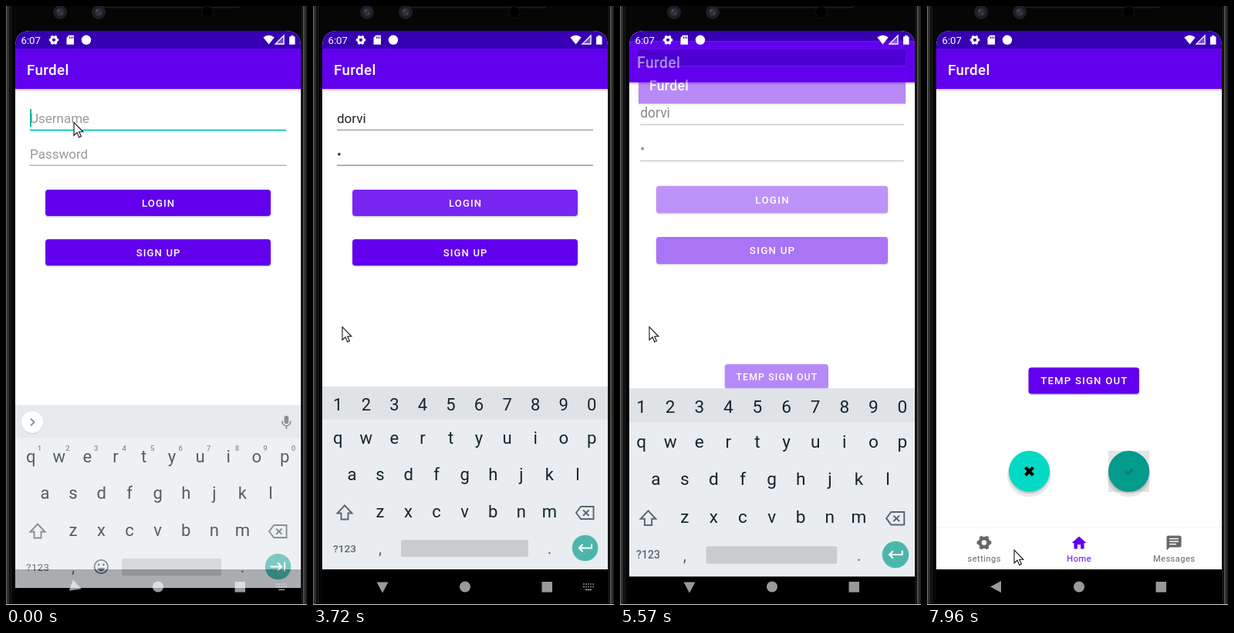
An HTML page that plays this animation: 390 by 773 pixels, repeating every 8 s.

```html
<!DOCTYPE html>
<html lang="en">
<head>
<meta charset="utf-8">
<title>Login demo</title>
<style>
html, body { margin: 0; width: 100%; height: 100%; overflow: hidden; background: #000; }
svg { display: block; width: 100%; height: 100%; font-family: Roboto, "Noto Sans", sans-serif; }
</style>
</head>
<body>
<svg id="stage" viewBox="0 0 390 773"></svg>
<script>
const LOOP = 8000, APP = 'Furdel', USER = 'dorvi';
const PURPLE = '#6200ee', TEAL = '#03dac5';

const rect = (x, y, w, h, fill, more = '') =>
  `<rect x="${x}" y="${y}" width="${w}" height="${h}" fill="${fill}" ${more}/>`;
const circle = (x, y, r, fill, more = '') =>
  `<circle cx="${x}" cy="${y}" r="${r}" fill="${fill}" ${more}/>`;
const path = (d, fill, more = '') => `<path d="${d}" fill="${fill}" ${more}/>`;
const line = (d, color, width = 2, more = '') =>
  path(d, 'none', `stroke="${color}" stroke-width="${width}" ${more}`);
const text = (x, y, size, fill, str, more = '') =>
  `<text x="${x}" y="${y}" font-size="${size}" fill="${fill}" ${more}>${str}</text>`;
const group = (id, body, more = '') => `<g id="${id}" ${more}>${body}</g>`;
const MID = 'text-anchor="middle"';

const gear = (x, y, r, color) =>
  circle(x, y, r * .58, 'none', `stroke="${color}" stroke-width="${r * .48}"`) +
  circle(x, y, r * .85, 'none',
    `stroke="${color}" stroke-width="${r * .3}" pathLength="12" stroke-dasharray="1 1" stroke-dashoffset=".5"`);

const button = (x, y, w, h, label, size = 13) =>
  rect(x, y + 1.5, w, h, '#000', 'rx="4" opacity=".2"') +
  rect(x, y, w, h, PURPLE, 'rx="4"') +
  buttonLabel(x + w / 2, y + h / 2, label, size);
const buttonLabel = (x, y, label, size) =>
  text(x + .6, y + 4.7, size, '#fff', label, `${MID} font-weight="500" letter-spacing="1.18"`);

const appTop = () =>
  rect(12, 32, 370, 740, '#fff') +
  rect(12, 107, 370, 3, '#000', 'opacity=".09"') +
  rect(12, 107, 370, 1.2, '#000', 'opacity=".12"') +
  rect(12, 32, 370, 23, '#3700b3') +
  rect(12, 55, 370, 52, PURPLE) +
  text(27, 88.7, 18.8, '#fff', APP, 'font-weight="500" letter-spacing=".35"');

function phone() {
  const side = x => rect(x, 0, 1.2, 773, '#8b8d86') + rect(x + 2.6, 0, 1, 773, '#4a4b47');
  return rect(0, 0, 390, 773, '#060606') +
    side(.4) + side(385.4) + rect(6, 0, 1, 773, '#252525') + rect(383, 0, 1, 773, '#252525') +
    line('M124 0Q125 2 129 2H298Q302 2 303 0', '#2a2a2a', 1) +
    [70, 120].map(x => circle(x, 8, 9, '#1d1f24') + circle(x, 8, 5, '#2d3038') +
      circle(x - 2, 6, 1.4, '#50545c') + circle(x + 2, 10, 1.2, '#484c55')).join('') +
    circle(261, 8, 7.5, '#000', 'stroke="#121212"') +
    rect(0, 772, 390, 1, '#cfc5c8');
}

function loginScreen() {
  return appTop() +
    group('userLine', '') + group('passLine', '') +
    text(31, 151.2, 17, '#999', 'Username', 'id="userText"') +
    text(31, 196.5, 17, '#999', 'Password', 'id="passText"') +
    rect(31, 133, 2, 23, '#06b5a5', 'id="caret"') +
    button(51, 237, 292, 34, '') +
    rect(51, 237, 292, 34, '#fff', 'id="focus" rx="4"') +
    circle(197, 254, 110, '#fff', 'id="ripple" opacity=".22" clip-path="url(#loginClip)"') +
    buttonLabel(197, 254, 'LOGIN', 13) +
    button(51, 301, 292, 34, 'SIGN UP');
}

function homeScreen() {
  const fab = (x, color) =>
    circle(x, 605, 28.5, '#000', 'opacity=".09"') + circle(x, 602.5, 27, '#000', 'opacity=".13"');
  const tab = (x, label, color) =>
    text(x + .2, 717, 11.1, color, label, `${MID} letter-spacing=".45"`);
  return appTop() +
    button(131.5, 466.5, 143.5, 34, 'TEMP SIGN OUT', 13.2) +
    fab(132.5) + circle(132.5, 600.5, 26.5, TEAL) +
    line('M127.5 595.5L137.5 605.5M137.5 595.5L127.5 605.5', '#000', 4.2) +
    fab(261.5) + rect(235, 574, 53, 53, '#000', 'opacity=".1"') +
    circle(261.5, 600.5, 26.5, '#039b8c') +
    line('M257 600.8L260.3 604L266.5 597.5', '#027e72', 2.8) +
    rect(12, 672.5, 370, 1, '#f0f0f0') + rect(12, 673.5, 370, 54, '#fff') +
    gear(74, 692.5, 9.4, '#666') + tab(74, 'settings', '#666') +
    path('M197 684.5L187.5 693H190.5V700.5H195V695H199V700.5H203.5V693H206.5Z', PURPLE) +
    tab(197, 'Home', PURPLE) +
    path('M312.5 683.5H327.5Q329.5 683.5 329.5 685.5V696.5Q329.5 698.5 327.5 698.5H314.5L310.5 702.5V685.5Q310.5 683.5 312.5 683.5Z', '#666') +
    line('M314 687.5H326M314 691H326M314 694.5H323', '#fff', 1.6) +
    tab(320, 'Messages', '#666');
}

function keyboard() {
  const ink = '#14252d', grey = '#5a676e';
  const row = (chars, x, y) => [...chars].map((c, i) =>
    text(x + i * 36.55, y, 22, ink, c, MID)).join('');
  const hints = [...'1234567890'].map((c, i) =>
    text(43.5 + i * 36.55, 550, 9.5, grey, c, `${MID} font-weight="500"`)).join('');
  const mic = path('M360.5 507.5a2.8 2.8 0 0 1 5.6 0v5a2.8 2.8 0 0 1-5.6 0z', grey) +
    line('M358 511.5v1a5.3 5.3 0 0 0 10.6 0v-1M363.3 517.8v4', grey, 1.7);
  const tools =
    circle(81.5, 511, 5, 'none', `stroke="${grey}" stroke-width="2"`) +
    line('M85 514.5L91 520.5', grey, 2.3) +
    line('M131 505.5H143Q144.500 505.500 144.500 507V514L139 520H131Q129.500 520 129.500 518.500V507Q129.500 505.500 131 505.500ZM139 520V514H144.500M133.500 513Q136 517 139 514', grey, 1.7) +
    circle(134, 510, 1.1, grey) + circle(140, 510, 1.1, grey) +
    text(190, 517.3, 13.3, grey, 'GIF', `${MID} font-weight="900" letter-spacing=".6"`) +
    rect(237.5, 505.5, 15, 15, grey, 'rx="1.5"') +
    rect(277, 502, 1, 22, '#c6cbcf') +
    [305, 311, 317].map(x => circle(x, 513, 2, grey)).join('');
  return rect(12, 491, 370, 236, '#e9edf0') +
    rect(12, 491, 370, 42.500, '#dfe3e6') +
    group('strip',
      rect(346, 491, 36, 42.5, '#cdd1d4', 'id="micBox"') +
      circle(34, 514, 14.2, '#000', 'opacity=".12"') + circle(34, 513, 14, '#fff') +
      line('', grey, 1.9, 'id="chevron"') + group('tools', tools) + mic + hints) +
    group('digits', row('1234567890', 32.3, 521.5)) +
    row('qwertyuiop', 32.3, 565) + row('asdfghjkl', 50.5, 612) + row('zxcvbnm', 87, 659.500) +
    line('M41 644.5L50.500 654.500H45.500V662.500H36.500V654.500H31.500Z', grey, 1.9) +
    line('M347 646H363.500V662H347L341 654ZM350 650.500L357.500 657.700M357.500 650.500L350 657.700', grey, 1.9) +
    text(41, 704.8, 13.7, grey, '?123', `${MID} font-weight="500"`) +
    text(87, 707, 21, grey, ',', MID) + text(306.500, 707, 21, grey, '.', MID) +
    group('emoji', circle(123.3, 699.5, 8.7, 'none', `stroke="${grey}" stroke-width="1.8"`) +
      circle(120.2, 697, 1.4, grey) + circle(126.4, 697, 1.4, grey) +
      path('M118.200 701.300H128.400Q126.500 705.500 123.300 705.500T118.200 701.300Z', grey)) +
    rect(150, 689, 129, 22, '#c9cdd0', 'id="space" rx="2.5"') +
    circle(352.5, 699.5, 16.8, '#4db6ac') + line('', '#fff', 2, 'id="enter"');
}

function statusIcons() {
  return text(19.5, 48.7, 13.2, '#fff', '6:07') + gear(62, 43.8, 6.3, '#fff') +
    path('M81.500 37.800H88V49.700H78.500V41Z', '#fff') +
    line('M82.500 39.500V42M84.500 39.500V42M86.500 39.500V42', '#3700b3', 1) +
    circle(104, 43.8, 6.2, '#fff') +
    path('M333.300 40.500Q340.500 35 347.700 40.500L340.500 49.500Z', '#fff') +
    path('M360 38V49H349Z', '#fff', 'fill-opacity=".3" stroke="#fff" stroke-width="1.3"') +
    path('M367 39.500H369V38H372.500V39.500H374.500V49.700H367Z', '#fff');
}

function navIcons() {
  const dots = [746, 749.5].map(y => line(`M350 ${y}H364`, '#fff', 1.7, 'stroke-dasharray="1.7 1.35"')).join('');
  return path('M82 749.500L96 742V757Z', '#fff', 'id="back"') +
    circle(197, 749.5, 7, '#fff') + rect(296.5, 743, 13.5, 13.5, '#fff') +
    group('imeIcon', dots + line('M353 753.300H361', '#fff', 1.5));
}

const toast = rect(104, 658, 186, 46, '#eee', 'rx="23" opacity=".9"') +
  text(197, 686.3, 13.35, '#202020', 'Successfully Logged In!', MID);

const stage = document.getElementById('stage');
stage.innerHTML = `<defs>
  <clipPath id="screen"><path d="M12 772V52Q12 32 32 32H362Q382 32 382 52V772Z"/></clipPath>
  <clipPath id="loginClip"><rect x="51" y="237" width="292" height="34" rx="4"/></clipPath>
</defs>` + phone() +
  `<g clip-path="url(#screen)">` +
  group('login', loginScreen()) + group('home', homeScreen()) +
  rect(12, 727, 370, 45, '#000') + group('keys', keyboard()) +
  group('nav', navIcons(), 'opacity=".6"') + statusIcons() + group('toast', toast) + '</g>' +
  path('M0 0V17L4 13.300L6.700 19.500L9.400 18.300L6.700 12.300H11.800Z', '#fff',
    'id="mouse" stroke="#15151d" stroke-width="1.1"');

const ui = {};
stage.querySelectorAll('[id]').forEach(n => ui[n.id] = n);
const set = (id, attrs) => { for (const k in attrs) ui[id].setAttribute(k, attrs[k]); };
const show = (id, on) => set(id, { visibility: on ? 'inherit' : 'hidden' });
const clamp = v => Math.max(0, Math.min(1, v));

const TICKS = [0, 120, 270, 390, 540, 890, 1040, 1160, 1410, 1840, 1990, 2190, 2310, 2680,
  3180, 3460, 3720, 5060, 5210, 5330, 5450, 5570, 5690, 5810, 5940, 6060, 6180,
  6550, 6700, 6850, 7000, 7120, 7270, 7390, 7540, 7660, 7810, 7960];

const POINTER = [[0, 88, 150], [540, 38, 402], [890, 38, 402], [1040, 38, 414], [5940, 38, 414],
  [6060, 90, 404], [6180, 133, 394], [6450, 133, 394], [6850, 18, 600], [7000, 18, 600],
  [7540, 125, 690], [7660, 118, 719], [7960, 113, 702]];

function pointerAt(t) {
  const i = POINTER.findIndex(p => p[0] > t);
  if (i < 0) return POINTER[POINTER.length - 1].slice(1);
  const [a, b] = [POINTER[i - 1], POINTER[i]], k = (t - a[0]) / (b[0] - a[0]);
  return [a[1] + (b[1] - a[1]) * k, a[2] + (b[2] - a[2]) * k];
}

// Fast start, very slow finish: two joined Bezier pieces.
function ease(x) {
  if (x <= 0 || x >= 1) return clamp(x);
  const [px, py] = x < 1 / 6
    ? [[0, .05, .13333, 1 / 6], [0, 0, .06, .4]]
    : [[1 / 6, .20833, .25, 1], [.4, .82, 1, 1]];
  const at = (p, u) => {
    const v = 1 - u;
    return v * v * v * p[0] + 3 * v * v * u * p[1] + 3 * v * u * u * p[2] + u * u * u * p[3];
  };
  let lo = 0, hi = 1;
  for (let i = 0; i < 24; i++) {
    const m = (lo + hi) / 2;
    if (at(px, m) < x) lo = m; else hi = m;
  }
  return at(py, lo);
}

const zoom = (s, dy = 0) => `translate(197 ${402 + dy}) scale(${s}) translate(-197 -402)`;
const between = (t, a, b) => t >= a && t < b;

function field(id, y, focused, filled) {
  ui[id].innerHTML = focused ? rect(31, y - .7, 332, 2, '#12d2bf')
    : rect(31, y - .5, 332, 1, filled ? '#777' : '#9a9a9a');
}

function draw(now) {
  const t = TICKS.filter(v => v <= now).pop();

  const typed = USER.slice(0, [1840, 1990, 2190, 2190, 2310].filter(v => v <= t).length);
  const inUser = t < 2680, inPass = between(t, 2680, 3720), hasPass = t >= 3460;
  ui.userText.textContent = typed || 'Username';
  set('userText', { fill: typed ? '#222' : '#999' });
  ui.passText.textContent = hasPass ? '•' : 'Password';
  set('passText', { fill: hasPass ? '#333' : '#999' });
  field('userLine', 160, inUser, true);
  field('passLine', 205.5, inPass, hasPass);

  const caretOff = between(t, 390, 890) || between(t, 1410, 1840) || between(t, 3180, 3460);
  show('caret', (inUser || inPass) && !caretOff);
  const caretX = inUser ? (typed ? 31 + ui.userText.getComputedTextLength() : 31) : hasPass ? 37 : 31;
  set('caret', { x: caretX, y: inUser ? 133 : 178 });

  set('focus', { opacity: t < 3720 ? 0 : t < 5330 ? .15 : .22 });
  show('ripple', between(t, 5060, 5330));
  set('ripple', { r: 110 + (t - 5060) * .3 });

  const open = (t - 5495) / 400, p = ease(open);
  set('login', { transform: zoom(1 + .05 * p) });
  set('home', { transform: zoom(.85 + .15 * p), opacity: clamp((t - 5547) / 50) });
  show('home', t >= 5570);
  show('login', t < 5940);

  const starting = t < 120, leaving = between(t, 5810, 5940);
  show('keys', t < 5940);
  set('keys', {
    transform: zoom(1 + .05 * p, starting || leaving ? 24 : 0),
    opacity: starting ? .73 : leaving ? .5 : 1
  });
  const wide = between(t, 390, 1840);
  show('strip', inUser);
  show('digits', !inUser);
  show('emoji', inUser);
  show('tools', wide);
  show('micBox', t >= 390 && inUser);
  set('chevron', { d: wide ? 'M36 508.500L31.500 513L36 517.500' : 'M32 508.500L36.500 513L32 517.500' });
  set('space', inUser ? { x: 150, width: 129 } : { x: 114, width: 165 });
  set('enter', {
    d: t < 3720 ? 'M342.500 699.500H357M352 694.500L357 699.500L352 704.500M361 693.500V705.500'
      : 'M361 694.500V699.500H345M349.500 694.800L344.800 699.500L349.500 704.200'
  });

  const turn = starting ? -160 : t < 5810 ? -90 : 0;
  set('back', { transform: `rotate(${turn} 90 749.5)` });
  show('imeIcon', t < 5570);

  set('toast', { opacity: t < 7000 ? clamp((t - 5880) / 180) : clamp((7660 - t) / 240) });
  set('mouse', { transform: `translate(${pointerAt(t)})` });
}

const start = performance.now();
function loop() {
  draw((performance.now() - start) % LOOP);
  requestAnimationFrame(loop);
}
loop();
</script>
</body>
</html>
```
